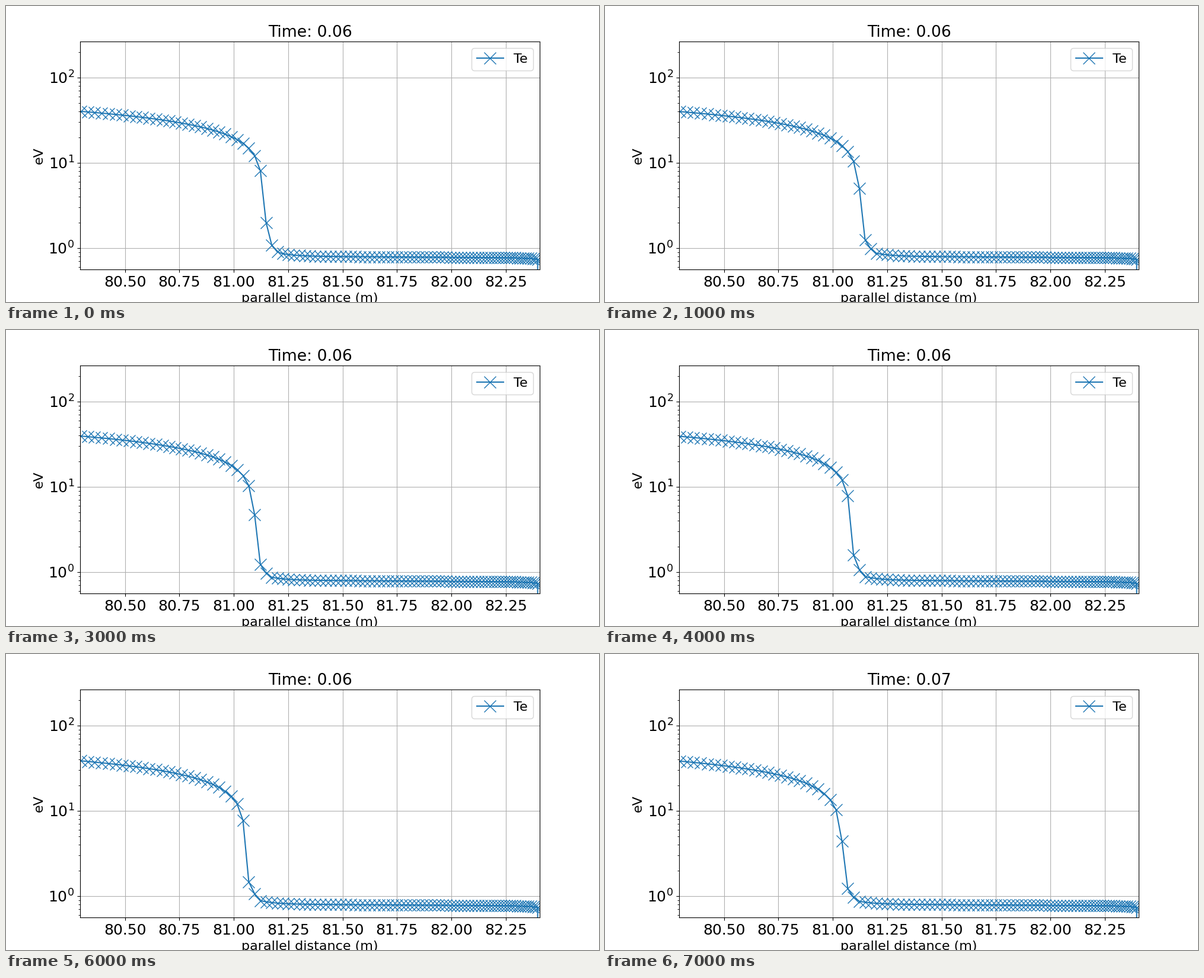
Recreate the animation shown at these times as a matplotlib script. Size 1000 by 500 pixels, loop 8 s.

```python
import matplotlib.pyplot as plt
import numpy as np
from matplotlib.animation import FuncAnimation

plt.rcParams.update({"font.family": "DejaVu Sans", "font.size": 16,
                     "xtick.labelsize": 18, "ytick.labelsize": 18})

FRAMES, INTERVAL = 8, 1000
WALL = 82.3962                              # m
FRONT_START, FRONT_STEP = 81.1364, 0.01357  # m, m per frame

# Cells counted from the wall: spacing grows linearly away from it.
cell = np.arange(100, -2, -1)
position = WALL - 0.01061 * cell - 0.0001139 * cell**2

# Key points of the steep drop: distance behind the front (m) and eV.
DROP_AT = [-0.001, 0.0004, 0.0117, 0.0137, 0.0256, 0.0385, 0.052, 0.065]
DROP_TE = [5.05, 4.44, 1.99, 1.475, 1.245, 1.08, 0.975, 0.892]


def temperature(step):
    behind = position - (FRONT_START - FRONT_STEP * step)
    hot = 43.1 * np.maximum(-behind, 1e-6) ** 0.395
    shelf = (0.800 - 0.0294 * (position - 81.315)
             + 0.21 * np.exp(-np.maximum(behind, 0) / 0.068)
             - 0.028 * np.exp((position - WALL) / 0.041))
    cold = np.maximum(shelf, np.interp(behind, DROP_AT, DROP_TE, right=0))
    te = np.where(behind < -0.002, hot, cold)
    te[-1] = 0  # empty guard cell behind the wall
    return te


fig, ax = plt.subplots(figsize=(10, 5), dpi=100)
line, = ax.plot(position, temperature(0), "-x", color="tab:blue",
                markersize=15, label="Te")
ax.set_yscale("log")
ax.set_xlim(80.29373, 82.40545)
ax.set_ylim(10**-0.25, 10**2.4236)
ax.set_xticks(np.arange(80.5, 82.3, 0.25))
ax.xaxis.set_major_formatter("{x:.2f}")
ax.set_xlabel("parallel distance (m)")
ax.set_ylabel("eV")
ax.grid(True)
ax.legend(loc="upper right")
title = ax.set_title("Time: 0.06")


def update(step):
    line.set_ydata(temperature(step))
    title.set_text("Time: 0.07" if step == FRAMES - 1 else "Time: 0.06")
    return line, title


anim = FuncAnimation(fig, update, frames=FRAMES, interval=INTERVAL,
                     repeat=True, repeat_delay=0)
plt.show()
```
